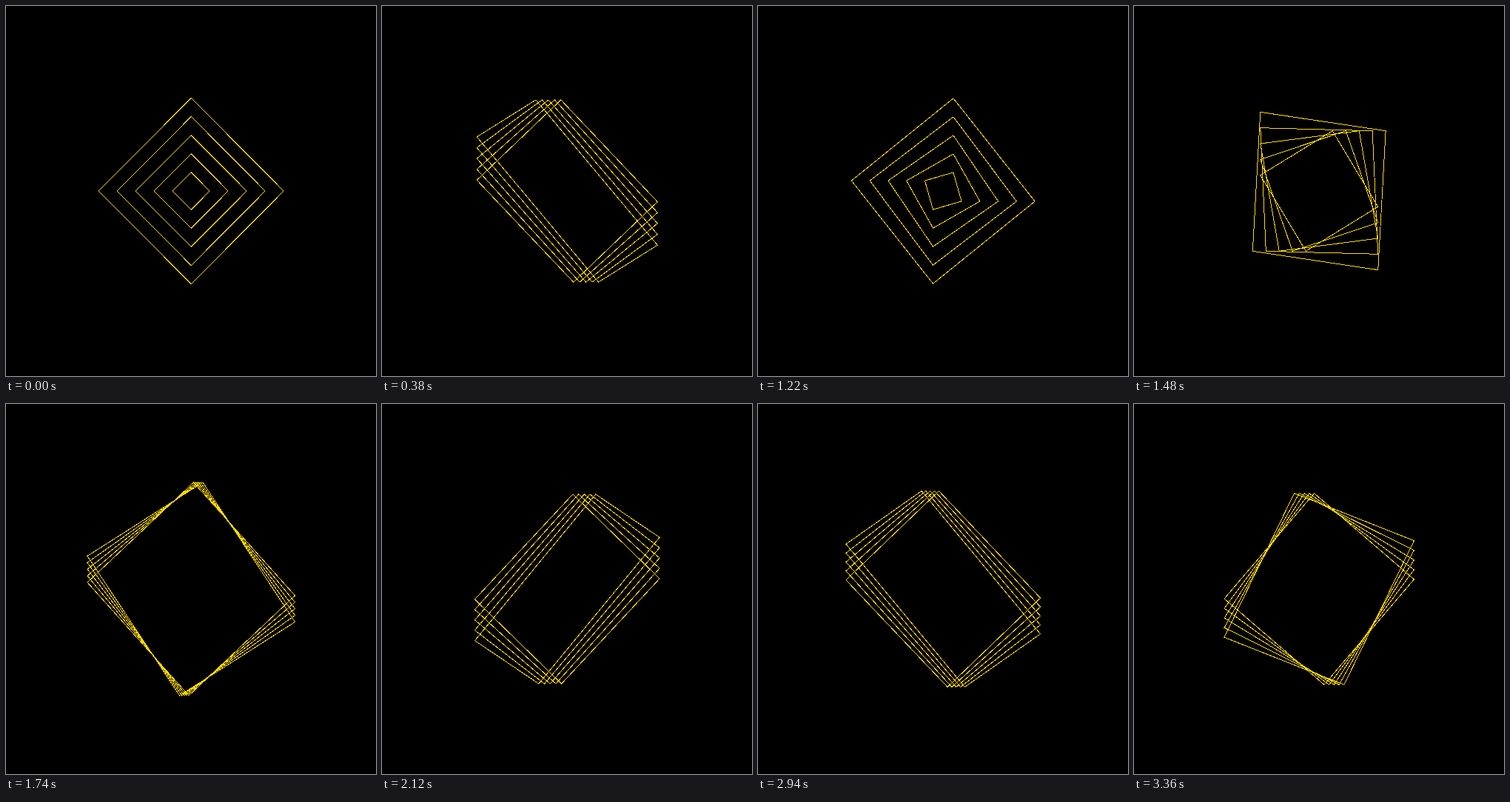
Write an HTML page that moves like this. It is 500 px wide and 500 px high and loops after 3380 ms.

```html
<!DOCTYPE html>
<html lang="en">
<head>
<meta charset="utf-8">
<title>Turning diamonds</title>
<style>
  html, body { margin: 0; width: 100%; height: 100%; overflow: hidden; background: #000; }
  svg { display: block; }
  polygon { fill: none; stroke: #ffd700; stroke-width: 1; }
</style>
</head>
<body>
<svg width="500" height="500" viewBox="0 0 500 500">
  <g id="rings" transform="translate(250.25 250)" shape-rendering="crispEdges"></g>
</svg>
<script>
const STEP = 20, STEPS = 169, TURN = 0.05;
const group = document.getElementById('rings');
const rings = Array.from({ length: 5 }, () =>
  group.appendChild(document.createElementNS('http://www.w3.org/2000/svg', 'polygon')));

// Each diamond is two points and their mirror images through the centre.
function draw(angle) {
  const s = Math.sin(angle), c = Math.cos(angle);
  rings.forEach((ring, i) => {
    const r = 25 * (i + 1);
    const ax = 150 * s, ay = 1.006 * r * c;
    const bx = r * c * c, by = 152.6 * s - 1.5 * s * s;
    ring.setAttribute('points', [ax, ay, bx, by, -ax, -ay, -bx, -by].map(v => v.toFixed(3)).join(' '));
  });
}

const start = performance.now();
function tick() {
  const t = performance.now() - start;
  draw(Math.floor((t + 1) / STEP) % STEPS * TURN);
  requestAnimationFrame(tick);
}
tick();
</script>
</body>
</html>
```
